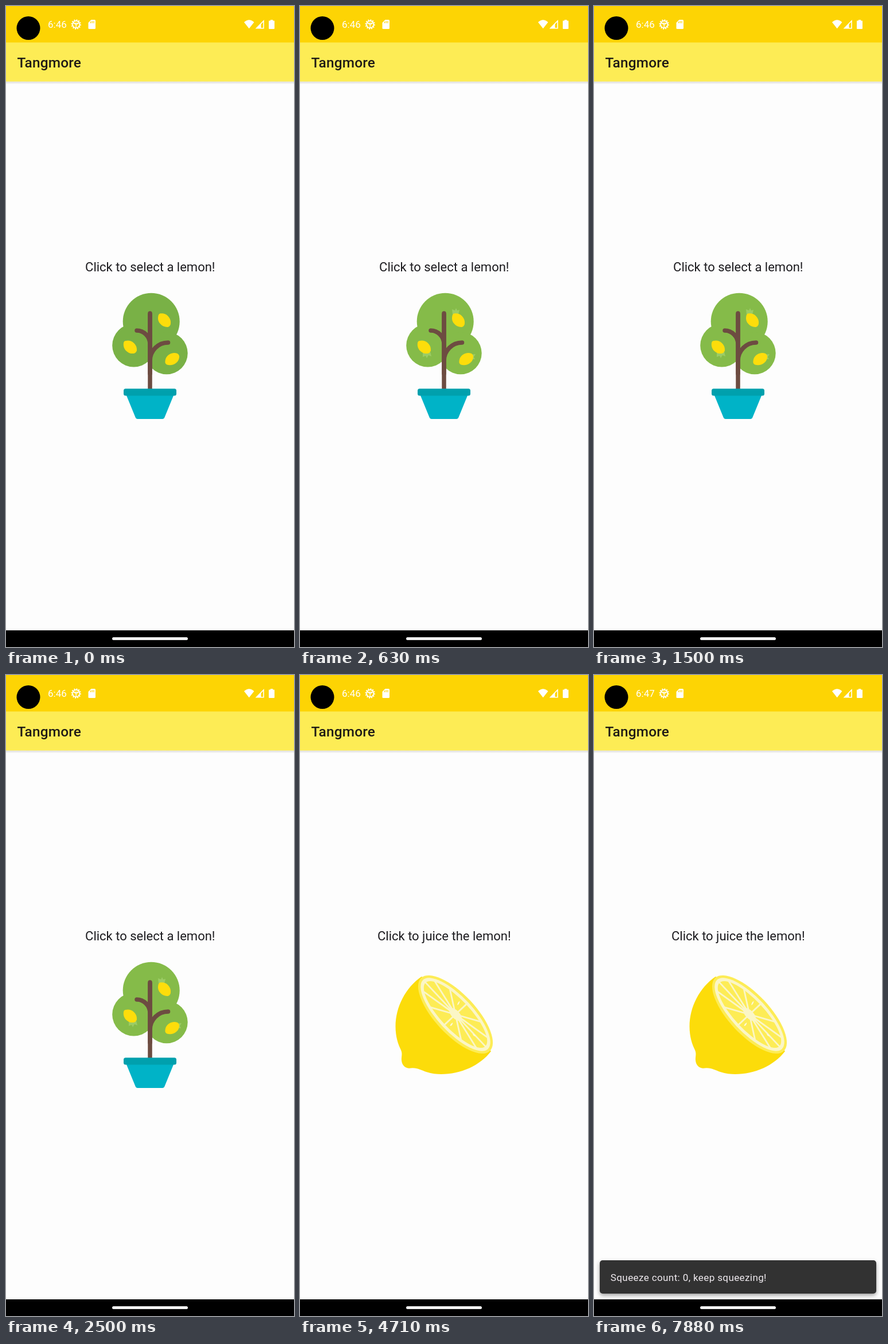
Animation, 502 px wide and 1116 px high, one loop 8000 ms. Source, as an HTML page:

```html
<!DOCTYPE html>
<html lang="en">
<head>
<meta charset="utf-8">
<title>Tangmore</title>
<style>
  html, body { margin: 0; width: 100%; height: 100%; overflow: hidden; background: #fdfdfd; }
  svg { display: block; width: 502px; height: 1116px; font-family: Roboto, sans-serif; }
  .title { font-size: 24.4px; font-weight: 500; letter-spacing: .2px; fill: #1f1b16; }
  .prompt { font-size: 22px; text-anchor: middle; fill: #1c1b1f; }
  .clock { font-size: 17px; }
  .note { font-size: 17.08px; letter-spacing: .36px; fill: #eee9ee; }

  .tree, .half, .before, .after { animation: 8s step-end infinite; }
  .tree { animation-name: tree; }
  .half { animation-name: half; }
  .before { animation-name: before; }
  .after { animation-name: after; }
  .leaves { animation: settle 8s linear infinite; }
  .crown { animation: crown 8s linear infinite; }
  .snack { animation: snack 8s infinite; transform-origin: 251px 1048px; }

  @keyframes tree { 0% { opacity: 1 } 45.875%, 100% { opacity: 0 } }
  @keyframes half { 0% { opacity: 0 } 45.875%, 100% { opacity: 1 } }
  @keyframes before { 0% { opacity: 1 } 85%, 100% { opacity: 0 } }
  @keyframes after { 0% { opacity: 0 } 85%, 100% { opacity: 1 } }
  @keyframes settle { 0%, .6% { opacity: 0 } 5%, 100% { opacity: 1 } }
  @keyframes crown { 0%, .6% { fill: #79b146 } 5%, 100% { fill: #85bb49 } }
  @keyframes snack {
    0%, 94.125% { opacity: 0; transform: scale(.8); animation-timing-function: cubic-bezier(0, 0, .2, 1) }
    96%, 100% { opacity: 1; transform: none }
  }
</style>
</head>
<body>
<svg viewBox="0 0 502 1116">
  <defs>
    <linearGradient id="edge" x2="0" y2="1">
      <stop stop-color="#000" stop-opacity=".13"/>
      <stop offset="1" stop-color="#000" stop-opacity="0"/>
    </linearGradient>
    <filter id="shade" x="-5%" y="-30%" width="110%" height="170%">
      <feDropShadow dx="0" dy="3" stdDeviation="3.5" flood-opacity=".38"/>
    </filter>
    <path id="fruit" d="M-13.5-2C-10-7-6-9.5 0-9.5C6-9.5 10-7 13-3Q14.5 0 13 3C10 7 6 9.5 0 9.5C-6 9.5-10 7-13.5 2Q-14.5 0-13.5-2Z"/>
  </defs>

  <rect width="502" height="1116" fill="#fdfdfd"/>
  <rect y="131.5" width="502" height="5" fill="url(#edge)"/>
  <rect width="502" height="64" fill="#fdd404"/>
  <rect y="63.5" width="502" height="68" fill="#fdec55"/>
  <circle cx="39" cy="38.5" r="20.5"/>

  <!-- status bar -->
  <g fill="#fff">
    <text class="clock before" x="73" y="38">6:46</text>
    <text class="clock after" x="73" y="38">6:47</text>
    <g fill="none" stroke="#fff">
      <circle cx="122.2" cy="32" r="6.1" stroke-width="1.7"/>
      <circle cx="122.2" cy="32" r="7.7" stroke-width="2" stroke-dasharray="2 2.03"/>
      <path d="M117 30H127.500M122.200 32V38M119 30L122.200 33L125.500 30" stroke-width="1.4"/>
    </g>
    <path d="M148.500 24H154.500Q156 24 156 25.500V38.500Q156 40 154.500 40H145Q143.500 40 143.500 38.500V29Z"/>
    <path d="M147.500 27V30M150.200 26V30M153 26V30" stroke="#fdd404" stroke-width="1.2"/>
    <path d="M415 28.200Q423.700 20.500 432.400 28.200L423.700 39.300Z"/>
    <path d="M449 26V38.700H436.500Z" fill="none" stroke="#fff" stroke-width="1.6"/>
    <path d="M436 39L444.500 30.500V39Z"/>
    <path d="M461 24H465V25.500H467Q468 25.500 468 26.500V39Q468 40 467 40H459Q458 40 458 39V26.500Q458 25.500 459 25.500H461Z"/>
  </g>
  <text class="title" x="19.500" y="107">Tangmore</text>

  <g class="tree">
    <text class="prompt" x="251.300" y="462">Click to select a lemon!</text>
    <g class="crown">
      <circle cx="253.200" cy="549.300" r="49.500"/>
      <circle cx="222.700" cy="591" r="37.500"/>
      <circle cx="280" cy="604.500" r="36.700"/>
    </g>
    <g fill="none" stroke="#6d4c41" stroke-width="7.500" stroke-linecap="round">
      <path d="M251 535V668" stroke-linecap="butt"/>
      <path d="M251 535V640M228 565C240 565 251 575 251 589M282.500 586C265 586 251 600 251 618"/>
    </g>
    <g class="leaves" fill="#9ccc65">
      <path d="M265 528L270 530L272 526L274 530L278 529L276 537L266 537Z"/>
      <path d="M214 604L227 602L229 610L224 608L221 613L219 609L214 611Z"/>
      <path d="M297 607L306 606L303 611L305 615L301 615L299 619L296 615Z"/>
    </g>
    <g fill="#fddd0b">
      <use href="#fruit" transform="translate(276 547) rotate(50)"/>
      <use href="#fruit" transform="translate(216.300 593.700) rotate(43)"/>
      <use href="#fruit" transform="translate(289.700 614.700) rotate(-34)"/>
    </g>
    <path d="M209.500 677H292.500L276.500 716Q275.500 719 272.500 719H229.500Q226.500 719 225.500 716Z" fill="#00b3c7"/>
    <rect x="205" y="666.300" width="92" height="12.200" rx="3.500" fill="#00a0ad"/>
  </g>

  <g class="half">
    <text class="prompt" x="251.300" y="462">Click to juice the lemon!</text>
    <path d="M212 525C184 544 166.500 578 166.500 612C166.500 630 171 643 176 653C179 660 176.500 664 177 671C178 681 185 685.500 193 684.500C204 683 211 688 220 691C230 694 238 695 246 695C280 695 314 680 333 655Z" fill="#fcdc0a"/>
    <g transform="translate(271 591) rotate(46.800)">
      <ellipse rx="87.300" ry="35.300" fill="#fdec55"/>
      <ellipse rx="82.500" ry="30.500" fill="#fbf6c6"/>
      <ellipse rx="76" ry="25.500" fill="#fdec55"/>
      <path id="spokes" stroke="#fbf6c6" stroke-width="2.800"/>
      <ellipse rx="14" ry="7" fill="#fbf6c6"/>
    </g>
    <g fill="#fdf9da">
      <path d="M274.500 575Q274 570 278.500 567.500Q278 573 274.500 575Z"/>
      <path d="M261.500 611Q262 607 266.500 605Q265.500 611 261.500 611Z"/>
      <path d="M301 625Q305 625 306 629Q302 629 301 625Z"/>
    </g>
  </g>

  <rect y="1087" width="502" height="29"/>
  <rect x="185" y="1099" width="132" height="5" rx="2.500" fill="#f2f2f2"/>

  <g class="snack">
    <rect x="10" y="1019" width="482" height="58" rx="5" fill="#313131" filter="url(#shade)"/>
    <text class="note" x="28.800" y="1055">Squeeze count: 0, keep squeezing!</text>
  </g>
  <rect y="1087" width="502" height="12"/>
</svg>
<script>
  const spokes = Array.from({ length: 12 }, (_, i) => {
    const a = i * Math.PI / 6;
    return `M0 0L${77 * Math.cos(a)} ${26.5 * Math.sin(a)}`;
  });
  document.getElementById('spokes').setAttribute('d', spokes.join(''));
</script>
</body>
</html>
```
